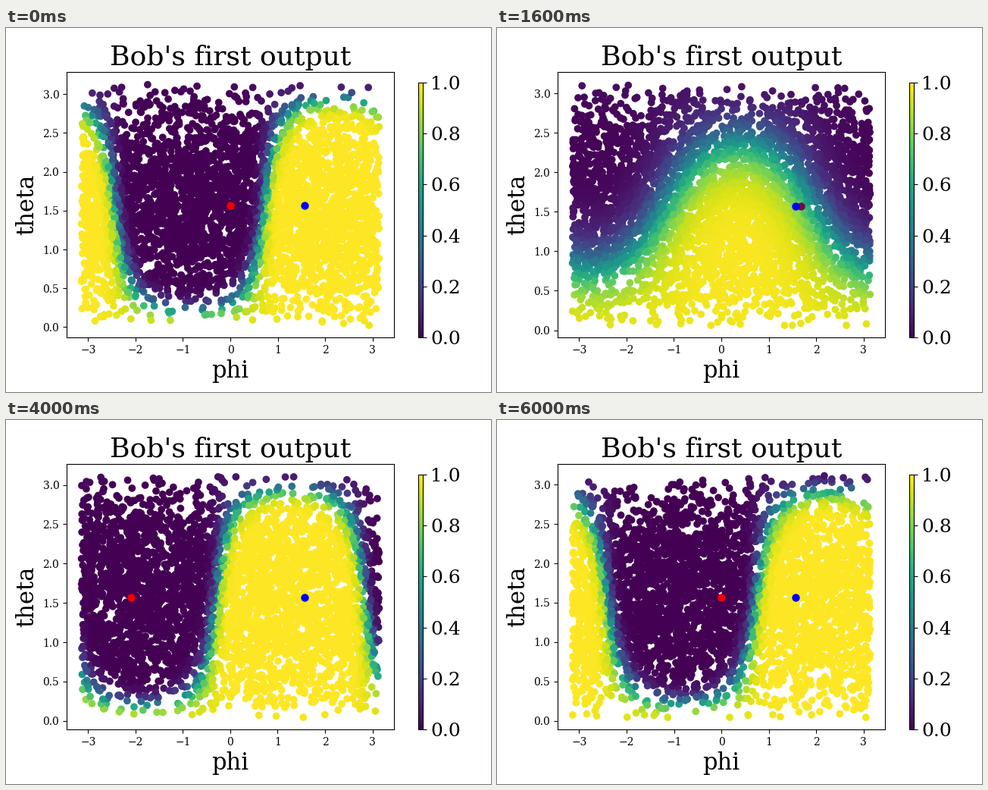
These frames come from a looping animation (640x480 px, 6.2 s). A matplotlib script:

```python
import numpy as np
import matplotlib.pyplot as plt
from matplotlib.animation import FuncAnimation
from matplotlib.cm import ScalarMappable

FRAMES, STEP = 31, 200
COUNT = 4000

plt.rcParams["font.family"] = "DejaVu Serif"

# Response of the model: sharpness and heading of the dark side,
# plus the lowest and highest sampled theta
KEYS = [0, 4, 8, 12, 16, 24, 30]
SHARP = [16, 10, 3.4, 12, 17, 19, 15]
HEADING = [-0.86, -0.51, -2.78, -2.64, -2.28, -1.5, -0.84]
LOW = [0.023, 0.006, 0.062, 0.019, 0.064, 0.028, 0.043]
HIGH = [3.134, 3.117, 3.12, 3.105, 3.12, 3.111, 3.115]
PULL = np.array(SHARP) * np.exp(1j * np.array(HEADING))
TILT, BIAS = 3.3, 0.12

RED, DULL_RED = "#f00000", "#760a38"
BLUE, DULL_BLUE = "#0000ff", "#3f4fa4"

fig = plt.figure(figsize=(6.4, 4.8), dpi=100)
fig.subplots_adjust(left=0.125, right=0.8, bottom=0.15, top=0.88)
ax = fig.add_subplot()
ax.set_title("Bob's first output", fontsize=26)
ax.set_xlabel("phi", fontsize=22)
ax.set_ylabel("theta", fontsize=22)
ax.set_xticks(range(-3, 4))
ax.set_yticks(np.arange(0, 3.1, 0.5))

cax = fig.add_axes([0.85, 0.15, 0.01, 0.7])
bar = fig.colorbar(ScalarMappable(plt.Normalize(0, 1), "viridis"), cax=cax)
bar.set_ticks(np.linspace(0, 1, 6))
bar.ax.tick_params(labelsize=18)

cloud = ax.scatter(np.zeros(COUNT), np.zeros(COUNT), c=np.zeros(COUNT),
                   cmap="viridis", vmin=0, vmax=1)


def setting_dot(color, z):
    return ax.scatter([np.pi / 2], [np.pi / 2], s=42, color=color,
                      zorder=z, antialiased=False)


red = setting_dot(RED, 3)
blue = setting_dot(BLUE, 4)


def wrap(angle):
    return (angle + np.pi) % (2 * np.pi) - np.pi


def padded(low, high):
    margin = 0.05 * (high - low)
    return low - margin, high + margin


def sample(k, low, high):
    rng = np.random.default_rng(100 + k)
    phi = rng.uniform(-np.pi, np.pi, COUNT)
    theta = np.arccos(rng.uniform(-1, 1, COUNT))
    return phi, np.clip(theta, low, high)


def response(k, phi, theta):
    pull = np.interp(k, KEYS, PULL)
    side = np.abs(pull) * np.sin(theta) * np.cos(phi - np.angle(pull))
    return 1 / (1 + np.exp(side - TILT * np.cos(theta) - BIAS))


def update(k):
    low, high = np.interp(k, KEYS, LOW), np.interp(k, KEYS, HIGH)
    phi, theta = sample(k, low, high)
    cloud.set_offsets(np.column_stack([phi, theta]))
    cloud.set_array(response(k, phi, theta))
    ax.set_xlim(padded(phi.min(), phi.max()))
    ax.set_ylim(padded(low, high))

    red.set_offsets([[wrap(2 * np.pi * k / (FRAMES - 1)), np.pi / 2]])
    red.set_color(DULL_RED if 3 <= k <= 9 else RED)
    faded = 3 <= k <= 6
    blue.set_facecolor(DULL_BLUE if faded else BLUE)
    blue.set_edgecolor("#2c3570" if faded else BLUE)
    return cloud, red, blue


anim = FuncAnimation(fig, update, frames=FRAMES, interval=STEP,
                     repeat=True, repeat_delay=0)
plt.show()
```
